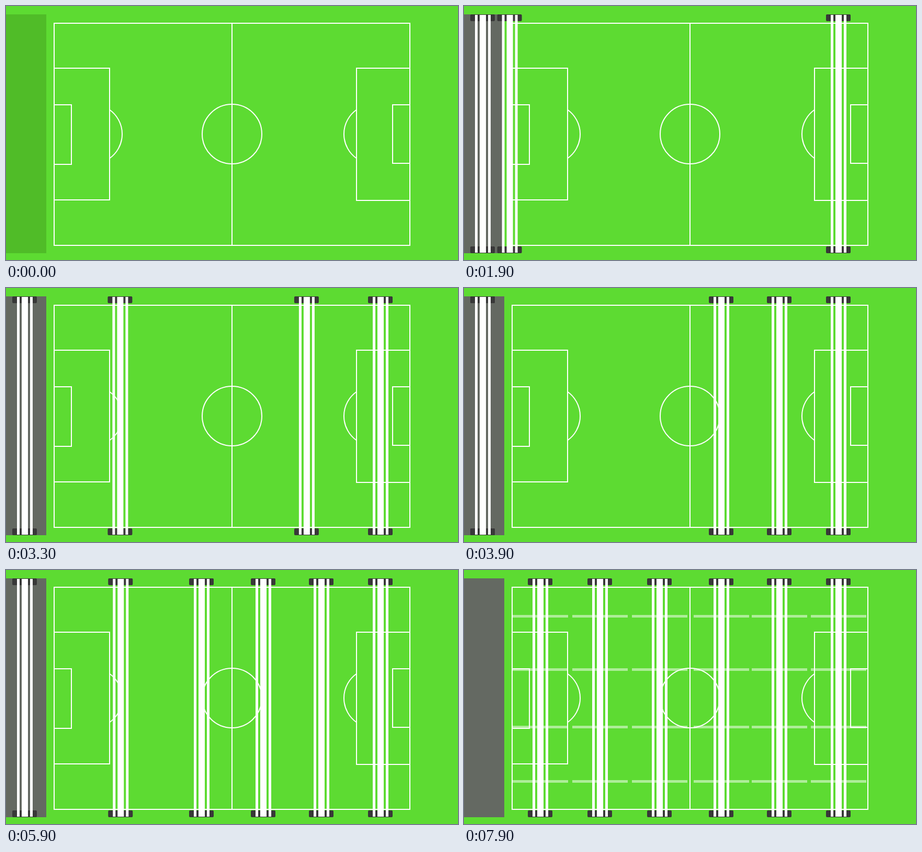
Recreate the animation shown at these times as an HTML page. Size 864 px wide and 486 px high, loop 8 s.

```html
<!DOCTYPE html>
<html lang="en">
<head>
<meta charset="utf-8">
<title>Pitch rows</title>
<style>
  html, body { margin: 0; width: 100%; height: 100%; overflow: hidden; background: #5ddb32; }
  svg { display: block; width: 864px; height: 486px; }
</style>
</head>
<body>
<svg viewBox="0 0 864 486" xmlns="http://www.w3.org/2000/svg">
  <defs>
    <g id="bar">
      <rect width="47" height="13" y="16" rx="2" fill="#383838"/>
      <rect width="47" height="13" y="460" rx="2" fill="#383838"/>
      <path d="M9 17h5v455h-5zM18 17h12v455h-12zM34 17h5v455h-5z" fill="#fff"/>
    </g>
  </defs>
  <rect width="864" height="486" fill="#5ddb32"/>
  <rect id="panel" y="16" width="77" height="457"/>
  <g id="dashes" fill="#fff"></g>
  <g fill="none" stroke="#fff" stroke-width="2">
    <path d="M92 33H772V458H92zM432 33V458"/>
    <circle cx="432" cy="245" r="57"/>
    <path d="M92 119H198V371H92M92 189H125V303H92M198 198.5A57 57 0 0 1 198 291.5"/>
    <path d="M772 119H670V372H772M772 189H739V301H772M670 198.5A57 57 0 0 0 670 291.5"/>
  </g>
  <use id="spare" href="#bar" x="12"/>
  <g id="bars"></g>
</svg>
<script>
const LOOP = 8000, STEP = 100, HOME = 12;
const PANEL_FROM = [80, 188, 40], PANEL_TO = [100, 105, 98];

// Each bar: [time, x] stops, linear between them
const paths = [
  [[700, HOME], [1800, 692]],
  [[1800, HOME], [2800, 527.5], [3900, 579]],
  [[2900, HOME], [3900, 468]],
  [[3900, HOME], [5000, 350]],
  [[5000, HOME], [6100, 236]],
  [[6100, HOME], [7200, 122]]
];

const $ = id => document.getElementById(id);
const add = (parent, tag, attrs) => {
  const el = document.createElementNS("http://www.w3.org/2000/svg", tag);
  for (const k in attrs) el.setAttribute(k, attrs[k]);
  return parent.appendChild(el);
};
const clamp = v => Math.max(0, Math.min(1, v));
const mix = (a, b, p) => a + (b - a) * p;

const bars = paths.map(() => add($("bars"), "use", { href: "#bar" }));
for (const path of paths)
  for (const y of [86, 188, 298, 402])
    add($("dashes"), "rect", { x: path[path.length - 1][1] - 29, y, width: 106, height: 5 });

function place(path, t) {
  let x = path[0][1];
  for (let i = 1; i < path.length; i++) {
    const [t0, x0] = path[i - 1], [t1, x1] = path[i];
    if (t >= t0) x = mix(x0, x1, clamp((t - t0) / (t1 - t0)));
  }
  return x;
}

// Soft blink: 0, .5, 1, .5, 0
function blink(t) {
  if (t < 7300) return 0;
  return 1 - Math.abs((t - 7300) % 500 - 200) / 200;
}

function draw(t) {
  const p = clamp(t / 700);
  const rgb = PANEL_FROM.map((c, i) => Math.round(mix(c, PANEL_TO[i], p)));
  $("panel").setAttribute("fill", `rgb(${rgb})`);
  $("spare").style.display = t >= 700 && t < 6100 ? "" : "none";
  $("dashes").setAttribute("opacity", blink(t));
  bars.forEach((bar, i) => {
    bar.style.display = t >= paths[i][0][0] ? "" : "none";
    bar.setAttribute("x", place(paths[i], t));
  });
}

const start = performance.now();
function tick() {
  const t = (performance.now() - start) % LOOP;
  draw(Math.floor(t / STEP) * STEP);
  requestAnimationFrame(tick);
}
tick();
</script>
</body>
</html>
```
